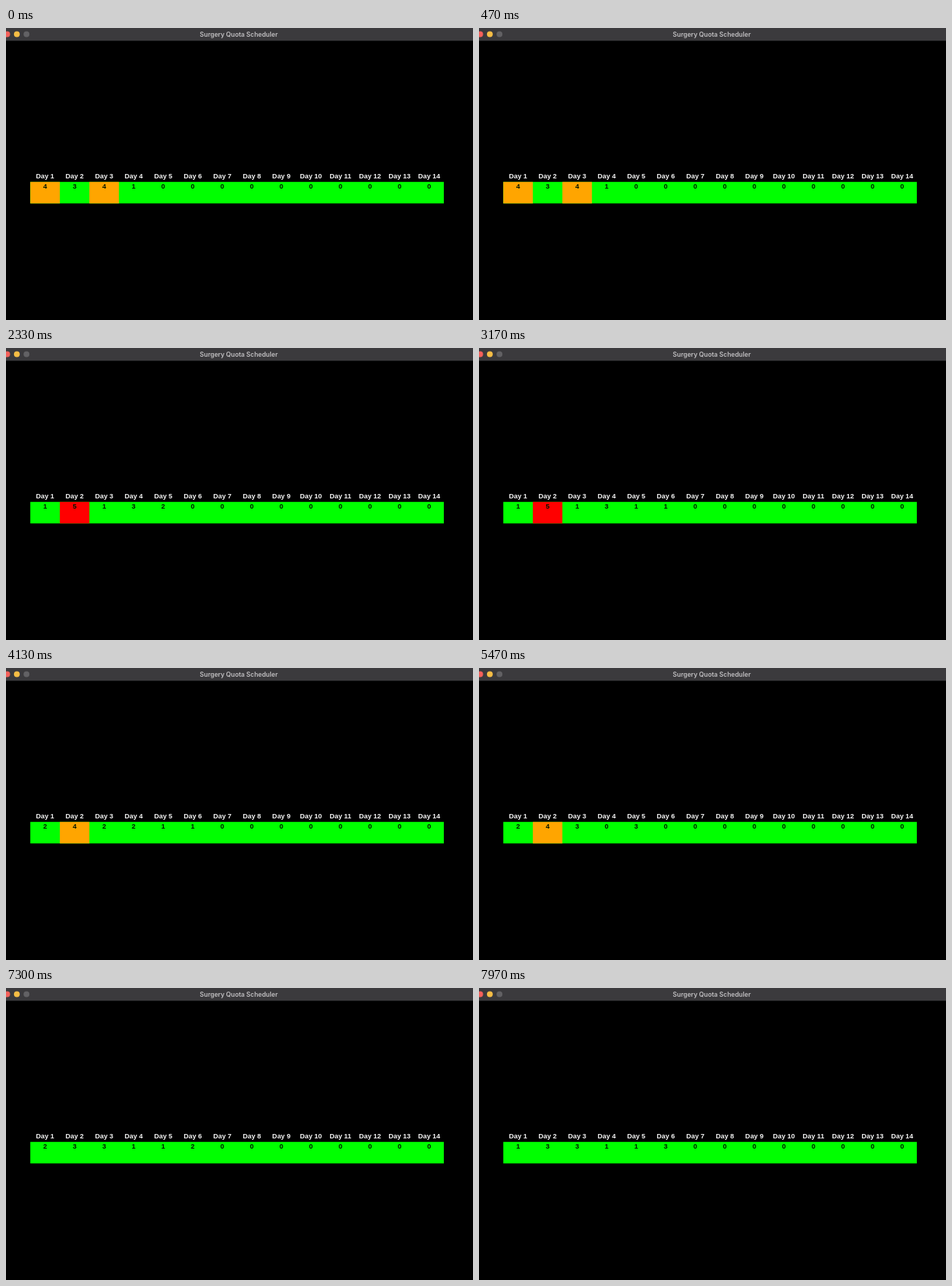
An HTML page with a canvas for the animation above (8 s loop, 640x400 px).

```html
<!DOCTYPE html>
<html lang="en">
<head>
<meta charset="utf-8">
<title>Surgery Quota Scheduler</title>
<style>
  html, body { margin: 0; width: 100%; height: 100%; overflow: hidden; background: #000; }
  canvas { display: block; }
</style>
</head>
<body>
<canvas width="640" height="400"></canvas>
<script>
const ctx = document.querySelector('canvas').getContext('2d');

const LOOP = 8000, DAYS = 14;
const LEFT = 33.3, PITCH = 40.48, TOP = 210.8, HEIGHT = 29.5;

// Key schedules: one digit per day, later days are empty.
const PLANS = [
  { at: 0, load: '4341' },
  { at: 1170, load: '3342' },
  { at: 2330, load: '15132' },
  { at: 4130, load: '242211' },
  { at: 5470, load: '24303' },
  { at: 6700, load: '233211' },
  { at: 7970, load: '133113' }
];

const parseLoad = load => Array.from(load.padEnd(DAYS, '0'), Number);

// Days where a has more surgeries than b, latest first, once per extra surgery.
const surplus = (a, b) =>
  a.flatMap((n, day) => Array(Math.max(0, n - b[day])).fill(day)).reverse();

// Between two plans, surgeries move one by one at even intervals.
function countsAt(time) {
  const i = PLANS.findLastIndex(plan => plan.at <= time);
  const plan = PLANS[i], next = PLANS[i + 1];
  const counts = parseLoad(plan.load);
  if (!next) return counts;

  const goal = parseLoad(next.load);
  const from = surplus(counts, goal), to = surplus(goal, counts);
  const progress = (time - plan.at) / (next.at - plan.at);
  const moved = Math.round(progress * from.length);
  for (let k = 0; k < moved; k++) {
    counts[from[k]]--;
    counts[to[k]]++;
  }
  return counts;
}

const loadColor = n => n > 4 ? '#f00' : n === 4 ? '#ffa500' : '#0f0';

function rect(x, y, width, height, color) {
  ctx.fillStyle = color;
  ctx.fillRect(x, y, width, height);
}

function text(str, x, y, color, font) {
  ctx.font = font;
  ctx.fillStyle = color;
  ctx.fillText(str, x, y);
}

function dot(x, color) {
  ctx.fillStyle = color;
  ctx.beginPath();
  ctx.arc(x, 8.6, 4, 0, Math.PI * 2);
  ctx.fill();
}

function drawTitleBar() {
  rect(0, 0, 640, 17.5, '#3b3a3d');
  ['#f4605a', '#f5bd45', '#626164'].forEach((color, i) => dot(1.6 + i * 13.25, color));
  text('Surgery Quota Scheduler', 319, 11.6, '#c0bfc1', '600 8.75px Inter, sans-serif');
}

function drawSchedule(counts) {
  const font = 'bold 9.4px "Liberation Sans", Arial, sans-serif';
  rect(LEFT, TOP, PITCH * DAYS, HEIGHT, loadColor(0));
  counts.forEach((n, day) => {
    const x = LEFT + day * PITCH, middle = x + PITCH / 2;
    if (n > 3) rect(x, TOP, PITCH, HEIGHT, loadColor(n));
    text('Day ' + (day + 1), middle, 206.4, '#f4f4f4', font);
    text(n, middle, 219.6, '#001400', font);
  });
}

function draw() {
  rect(0, 0, 640, 400, '#000');
  ctx.textAlign = 'center';
  drawTitleBar();
  drawSchedule(countsAt(performance.now() % LOOP));
  requestAnimationFrame(draw);
}
draw();
</script>
</body>
</html>
```
